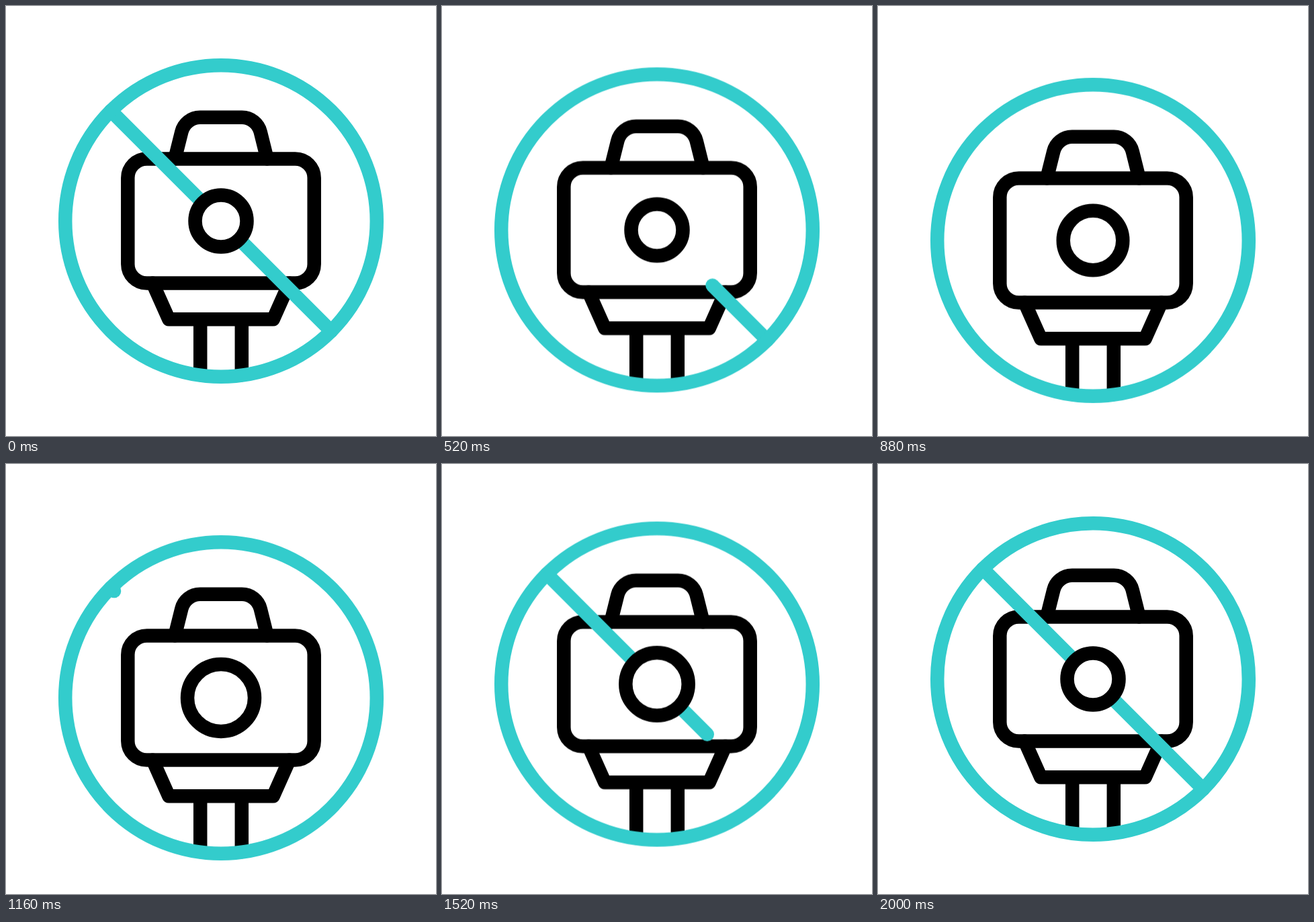
Recreate the animation shown at these times as an HTML page. Size 640x640 px, loop 2120 ms.

```html
<!DOCTYPE html>
<html lang="en">
<head>
<meta charset="utf-8">
<title>No camera sign</title>
<style>
  html, body { margin: 0; width: 100%; height: 100%; overflow: hidden; background: #fff; }
  svg { display: block; width: 100%; height: 100%; }

  g { fill: none; stroke-width: 20.5; stroke-linecap: round; stroke-linejoin: round; }
  .camera, .lens { stroke: #000; }
  .teal { stroke: #3cc; }
  .lens { fill: #fff; }
  .slash { stroke-dasharray: 1 3; }

  /* Paused: the script seeks these in steps of 40 ms. */
  .sign, .slash, .lens {
    animation: 1920ms cubic-bezier(.55, 0, .45, 1) calc(var(--step, 0) * -40ms) both paused;
  }
  .sign { animation-name: bob; }
  .slash { animation-name: wipe; }
  .lens { animation-name: swell; }

  @keyframes bob {
    0%, 91.667%, 100% { transform: translateY(0); }
    47.917% { transform: translateY(29.5px); }
  }
  @keyframes wipe {
    0%, 2.083% { stroke-dashoffset: 0; }
    35.417% { stroke-dashoffset: -1; animation-timing-function: step-end; }
    52.083% { stroke-dashoffset: 1; }
    89.583%, 100% { stroke-dashoffset: 0; }
  }
  @keyframes swell {
    0%, 25%, 100% { r: 38.5px; }
    58.333% { r: 50.05px; }
  }
</style>
</head>
<body>
<svg viewBox="0 0 640 640">
  <g class="sign">
    <g class="camera">
      <path d="M289.2 466.2V549M350.8 466.2V549"/>
      <path d="M218.3 412.5L242.3 466.2H397.7L421.7 412.5"/>
      <path d="M251.3 227.4L261.3 187.4A28.4 28.4 0 0 1 289 165.8H351A28.4 28.4 0 0 1 378.7 187.4L388.7 227.4"/>
      <rect x="181.3" y="227.4" width="277.4" height="185.1" rx="28.3"/>
    </g>
    <g class="teal">
      <path class="slash" pathLength="1" d="M156 156L484 484"/>
      <circle cx="320" cy="320" r="231.8"/>
    </g>
    <circle class="lens" cx="320" cy="320" r="38.5" stroke-width="20.5"/>
  </g>
</svg>
<script>
  const LOOP = 2120, STEP = 40, LEAD = 80, LAST = 48;
  const root = document.documentElement;

  function tick() {
    const time = performance.now() % LOOP;
    const step = Math.floor((time - LEAD) / STEP);
    root.style.setProperty('--step', Math.min(LAST, Math.max(0, step)));
    requestAnimationFrame(tick);
  }
  tick();
</script>
</body>
</html>
```
